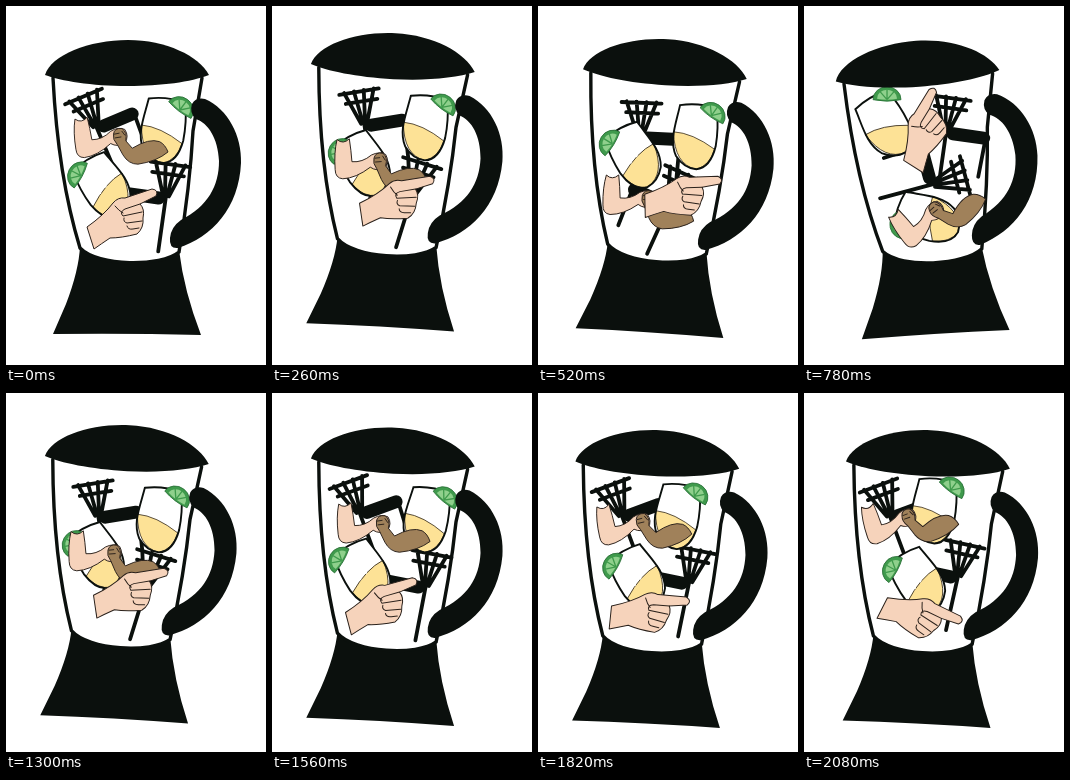
These frames come from a looping animation (260x359 px, 2.34 s). An HTML page:

```html
<!DOCTYPE html>
<html lang="en">
<head>
<meta charset="utf-8">
<title>Blender</title>
<style>
html, body { margin: 0; width: 100%; height: 100%; overflow: hidden; background: #fff; }
svg { display: block; width: 100%; height: 100%; }
.ink { fill: #0b100d; }
.rod, .seat, .line { fill: none; stroke: #0b100d; stroke-width: 3.8; stroke-linecap: round; }
.seat { stroke-width: 13; }
.line { stroke-width: 1.9; }
.skin { fill: #f6d3bb; stroke: #2a211b; stroke-width: 1; stroke-linejoin: round; }
.fold { fill: none; stroke: #2a211b; stroke-width: 1; stroke-linecap: round; }
.brown { fill: #a0815a; }
.wine { fill: #fde296; stroke: #3a3020; stroke-width: .8; }
.fizz { fill: none; stroke: #fff; stroke-width: 2.6; stroke-linecap: round; stroke-dasharray: 3 3; }
</style>
</head>
<body>
<svg viewBox="0 0 260 359">
  <defs>
    <g id="stool">
      <path class="rod" id="rods"/>
      <path class="seat" d="M7 3H38"/>
    </g>
    <g id="glass">
      <path fill="#fff" d="M-18-31C-21-12-27 5-19 20Q-10 32 2 32Q16 30 20 8Q22-10 19-30Q0-35-18-31Z"/>
      <path class="wine" d="M-23-4Q-4-4 19 11Q15 28 2 32Q-20 29-23-4Z"/>
      <path class="line" d="M-18-31C-21-12-27 5-19 20Q-10 32 2 32Q16 30 20 8Q22-10 19-30Q0-35-18-31Z"/>
      <g transform="translate(15-24) rotate(32)">
        <path fill="#3f9a4c" stroke="#2a7038" stroke-width=".8" d="M-14 2A14 13 0 0 1 14 2Q0 5-14 2Z"/>
        <path fill="#8fd08c" d="M-10 1A10 9 0 0 1 10 1Q0 3-10 1Z"/>
        <path fill="none" stroke="#3f9a4c" stroke-width="1.3" d="M0 2V-9M0 2L-7-6M0 2L7-6"/>
      </g>
    </g>
  </defs>
  <g id="blender">
    <path class="ink" d="M74 240Q73 264 60 298L47 328Q120 327 195 329Q178 285 173 244Z"/>
    <path fill="#fff" d="M47 72Q52 165 74 242C92 261 155 261 173 246Q185 170 196 72Z"/>
    <path class="line" style="stroke-width:3.4" d="M47 72Q52 170 74 242C92 261 155 261 173 246Q184 180 187 125L196 72"/>
    <use href="#stool" id="stool1"/>
    <use href="#stool" id="stool2"/>
    <g id="glass1">
      <use href="#glass"/>
      <path class="fizz" d="M-7-5L-2-1L2-5L6 2L9 0"/>
    </g>
    <use href="#glass" id="glass2"/>
    <g id="arms"><g transform="scale(.94) translate(-115-130)">
      <path class="skin" d="M66 112Q73 117 79 110Q82 122 84 134Q95 134 104 125Q112 120 119 123Q124 130 119 138Q111 142 104 138Q90 151 76 153Q68 153 67 144Q64 126 66 112Z"/>
      <path class="skin brown" d="M107 128Q108 121 116 122Q122 126 120 135L127 143Q145 132 156 136Q162 139 165 147Q153 157 133 160Q123 160 117 150L111 139Q106 134 107 128Z"/>
      <path class="fold" d="M108 128L113 127M109 132L115 131M116 125L119 129"/>
    </g></g>
    <g id="hand"><g transform="translate(-115-213)">
      <path class="skin" d="M81 221Q98 209 107 197Q112 191 119 192L146 183Q153 184 150 190L134 198Q139 203 137 212Q138 222 131 228Q115 232 104 232Q95 238 88 243Z"/>
      <path class="fold" d="M134 198L119 203Q113 206 117 210L136 206M118 212Q117 216 121 217L136 215M121 220Q122 224 127 223L133 222M109 200Q113 205 117 207"/>
    </g></g>
    <path class="ink" d="M39 69C45 49 83 34 122 34C160 34 193 50 203 69C185 76 155 80 122 80C85 80 55 75 39 69Z"/>
    <path class="ink" d="M186 98Q190 91 199 93C222 103 236 130 235 157C233 202 206 231 172 242Q163 243 164 232Q165 221 175 214C202 200 213 180 213 155C212 132 202 117 190 113Q183 107 186 98Z"/>
  </g>
</svg>
<script>
const HOLD = 260;
const el = id => document.getElementById(id);

// Stool frame: two rails, slats that meet at the seat, a long and a short leg.
const slats = [-15, -5, 5, 15].map(x => `M${x}-33L${x / 5} 0`).join('');
el('rods').setAttribute('d', `M-20-32H20M-15-22H17${slats}M0 0V56M40 3L38 42`);

// The food swings back and forth through four stops; each is x, y, turn inside the jug.
const STOPS = [-2, 0, 2, 3];
const FOOD = {
  stool1: [[85, 121, -23], [90, 120, -23], [100, 131, -1], [146, 125, 12]],
  stool2: [[156, 178, 10], [160, 190, 8], [134, 197, 21], [130, 178, 79]],
  glass1: [[117, 187, -32], [98, 182, -30], [96, 154, -30], [122, 213, -66]],
  glass2: [[130, 115, 2], [158, 125, 5], [156, 130, 0], [87, 117, -28]],
  arms: [[105, 121, -12], [115, 130, 0], [113, 194, 5], [131, 203, -26]],
  hand: [[117, 220, 42], [115, 213, 0], [143, 190, 13], [124, 126, -36]]
};
const MIRRORED = ['stool2', 'glass1'];

// The jug's shake, one jolt per step: x, y, lean.
const JOLTS = [
  [0, 0, 0], [-5, -7, 2.8], [0, -1, 3.4], [-.5, .5, -4], [0, 2.5, 5.4],
  [-5, -2, 2.8], [-5, .5, 2.8], [-6, 3, 2.5], [-1.4, 3, 2.5]
];

const swing = step => 3 - Math.abs(3 - step);

function poseAt(keys, s) {
  const i = Math.max(1, STOPS.findIndex(stop => stop >= s));
  const k = (s - STOPS[i - 1]) / (STOPS[i] - STOPS[i - 1]);
  return keys[i].map((v, n) => keys[i - 1][n] + (v - keys[i - 1][n]) * k);
}

function place(id, [x, y, turn], extra = '') {
  el(id).setAttribute('transform', `translate(${x} ${y}) rotate(${turn}${extra}`);
}

function draw(step) {
  place('blender', JOLTS[step], ' 121 168)');
  for (const id in FOOD) {
    place(id, poseAt(FOOD[id], swing(step)), MIRRORED.includes(id) ? ') scale(-1 1)' : ')');
  }
}

const start = performance.now();
function tick() {
  const t = Math.max(0, performance.now() - start);
  draw(Math.floor(t / HOLD) % JOLTS.length);
  requestAnimationFrame(tick);
}
tick();
</script>
</body>
</html>
```
